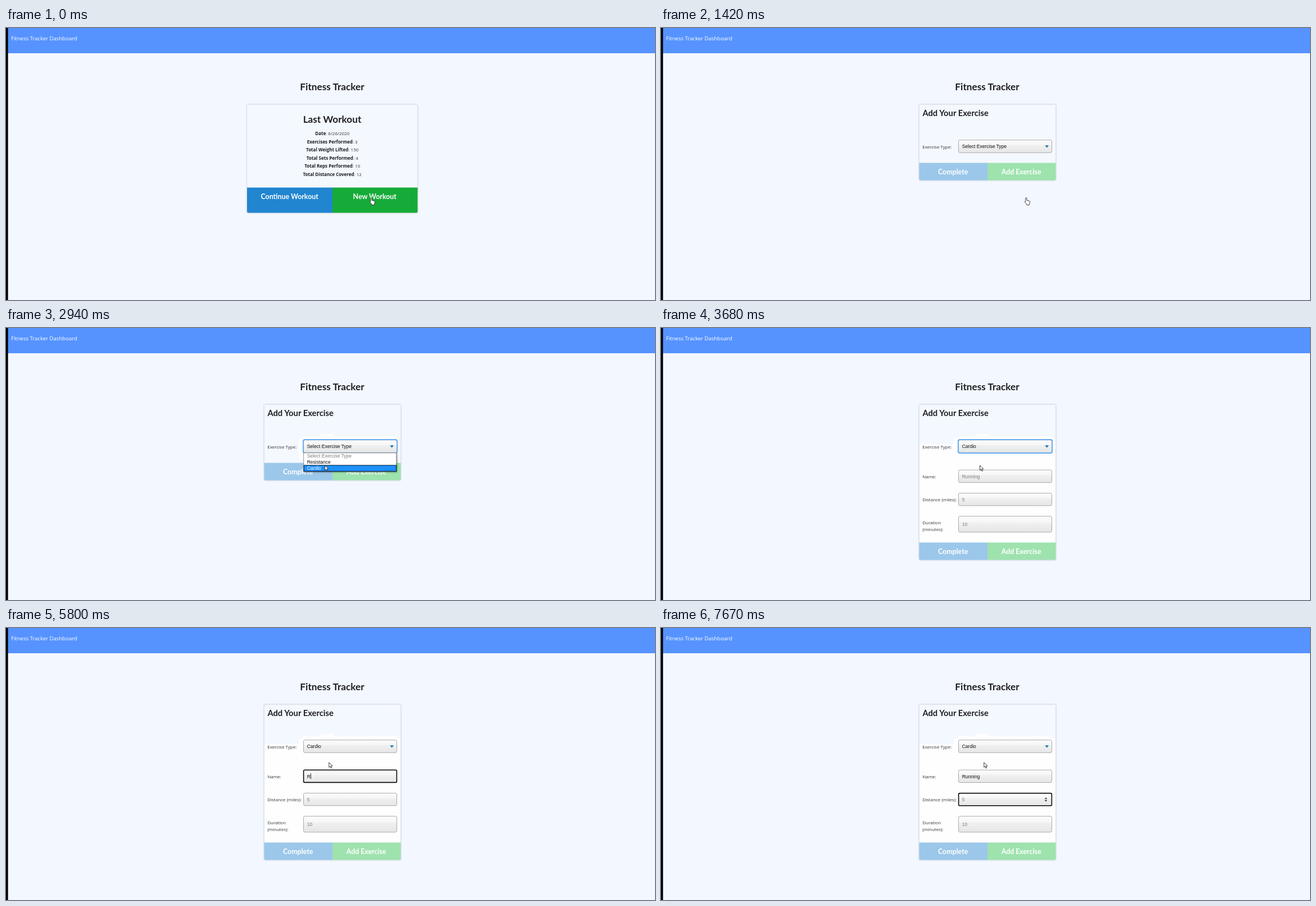
Animation, 1155 px wide and 485 px high, one loop 8 s. Source, as an HTML page:

```html
<!DOCTYPE html>
<html lang="en">
<head>
<meta charset="utf-8">
<title>Fitness Tracker</title>
<style>
html, body { margin: 0; width: 100%; height: 100%; overflow: hidden; background: #f3f7ff; }
svg { display: block; width: 1155px; height: 485px; }
text { fill: #303235; font: 8px "Open Sans", "Noto Sans", sans-serif; white-space: pre; }
.title { font: 700 17.2px Lato, sans-serif; fill: #1d1f22; }
.sub { font: 700 14.75px Lato, sans-serif; fill: #1d1f22; }
.btn { font: 700 12.35px Lato, sans-serif; fill: #fff; }
.mid { text-anchor: middle; }
.ctl { font: 8.52px "Liberation Sans", Arial, sans-serif; fill: #111; }
.ctl.hint { fill: #7d7d7d; }
.b { font-weight: 700; fill: #1d1f22; }
.card { filter: drop-shadow(0 .7px 1.3px #0005); }
.box { fill: url(#shade); stroke: #aaa; }
.focus { fill: none; stroke: #0b0b0b; stroke-width: 1.6; }
.cursor { fill: #fff; stroke: #111; stroke-width: .8; stroke-linejoin: round; }
.menu { filter: drop-shadow(1px 1.5px 1.2px #0008); }
</style>
</head>
<body>
<svg viewBox="0 0 1155 485">
  <defs>
    <linearGradient id="shade" x2="0" y2="1">
      <stop stop-color="#fcfcfd"/>
      <stop offset=".38" stop-color="#f6f6f7"/>
      <stop offset=".42" stop-color="#f0f0f0"/>
      <stop offset="1" stop-color="#e6e6e6"/>
    </linearGradient>
    <clipPath id="round"><rect x="429" y="136.5" width="303.5" height="193" rx="2.5"/></clipPath>
  </defs>
  <rect width="1155" height="485" fill="#f3f7ff"/>
  <rect width="1155" height="45" fill="#5693ff"/>
  <rect width="3.6" height="485"/>
  <text x="9" y="22" style="font-size:9.55px;fill:#fff">Fitness Tracker Dashboard</text>
  <text class="title mid" x="580.5" y="111.2">Fitness Tracker</text>

  <g id="home">
    <rect class="card" x="429" y="136.5" width="303.5" height="193" rx="2.5" fill="#f4f8ff"/>
    <g clip-path="url(#round)">
      <rect x="429" y="284.5" width="152.3" height="46" fill="#2185d0"/>
      <rect id="newBtn" x="581" y="284.5" width="152" height="46"/>
    </g>
    <text class="title mid" x="580.5" y="169">Last Workout</text>
    <g id="stats"></g>
    <text class="btn mid" x="504.7" y="304.8">Continue Workout</text>
    <text class="btn mid" x="656.2" y="304.8">New Workout</text>
  </g>

  <g id="form">
    <rect id="card" class="card" x="459.5" y="136.5" width="243" rx="2" fill="#f4f8ff"/>
    <path id="glowA" fill="#fefeff" d="M529 193H560V189H583V193H696V199H529Z"/>
    <path id="glowB" fill="#fefeff" d="M521 197H698V234H521Z"/>
    <path id="body" fill="#fefeff" d="M460 207H521V197H702V383H460Z"/>
    <text class="sub" x="465.4" y="157">Add Your Exercise</text>
    <text x="465.2" y="214.5">Exercise Type:</text>
    <rect class="box" x="529.5" y="199.8" width="166" height="22.5" rx="2.5"/>
    <rect id="ring" x="528.9" y="199.1" width="167.3" height="24" rx="3" fill="none" stroke="#68adf2" stroke-width="2"/>
    <text id="choice" class="ctl" x="535.7" y="214"></text>
    <path fill="#1873b0" d="M683.3 209.2H690.2L686.7 213.4Z"/>
    <g id="more">
      <text x="465.2" y="268">Name:</text>
      <text x="465.2" y="309.4">Distance (miles):</text>
      <text x="465.2" y="350.4">Duration</text>
      <text x="465.2" y="362">(minutes):</text>
      <rect class="box" x="529.5" y="253.2" width="166" height="22.3" rx="2.5"/>
      <rect class="box" x="529.5" y="294.5" width="166" height="22.3" rx="2.5"/>
      <rect class="box" x="529.5" y="335.6" width="166" height="28.4" rx="2.5"/>
      <text id="name" class="ctl" x="535.7" y="267.5"></text>
      <text class="ctl hint" x="535.7" y="308.8">5</text>
      <text class="ctl hint" x="535.7" y="353">10</text>
      <rect id="nameFocus" class="focus" x="529.6" y="253.3" width="165.8" height="22.1" rx="2"/>
      <g id="distFocus">
        <rect class="focus" x="529.6" y="294.6" width="165.8" height="22.1" rx="2"/>
        <path fill="#333" d="M682.4 304.8H687.4L684.9 302.2ZM682.4 306.8H687.4L684.9 309.4Z"/>
      </g>
      <rect id="caret" width=".8" height="10"/>
    </g>
    <g id="actions">
      <path fill="#9bc7ea" d="M459.5 0H581.2V31H461.5Q459.5 31 459.5 29Z"/>
      <path fill="#9ee2ae" d="M581 0H702.5V29Q702.5 31 700.5 31H581Z"/>
      <text class="btn mid" x="519.7" y="20.8">Complete</text>
      <text class="btn mid" x="641.2" y="20.8">Add Exercise</text>
    </g>
    <g id="menu">
      <rect class="menu" x="529.8" y="222.8" width="165" height="33" fill="#fff" stroke="#777" stroke-width=".7"/>
      <rect id="mark" x="530.2" width="164.3" height="10.6"/>
      <text class="ctl hint" x="535.7" y="231">Select Exercise Type</text>
      <text id="opt1" class="ctl" x="535.7" y="242">Resistance</text>
      <text id="opt2" class="ctl" x="535.7" y="253">Cardio</text>
    </g>
  </g>

  <path id="hand" class="cursor" d="M3.2.5C4 .5 4.4 1 4.4 1.7V5.3L8.6 6.3C9.5 6.5 9.9 7 9.8 7.9L9.2 11.2 8.6 12.3V13.6H4.2V12.4L.9 8.6C.4 7.8 1.2 6.9 2.1 7.6V1.7C2.1 1 2.5.5 3.2.5Z"/>
  <path id="arrow" class="cursor" d="M.5.5V9.3L2.6 7.4 4 10.8 5.4 10.2 4 6.9H6.8Z"/>
  <path id="beam" fill="none" stroke="#222" stroke-width=".8" d="M-2-6H2M0-6V6M-2 6H2"/>
</svg>
<script>
const LOOP = 8000;
const $ = id => document.getElementById(id);
const show = (id, on) => { $(id).style.display = on ? '' : 'none'; };
const set = (id, attrs) => { for (const k in attrs) $(id).setAttribute(k, attrs[k]); };

$('stats').innerHTML = [
  ['Date', '6/26/2020'], ['Exercises Performed', 3], ['Total Weight Lifted', 150],
  ['Total Sets Performed', 4], ['Total Reps Performed', 10], ['Total Distance Covered', 12]
].map(([label, value], i) =>
  `<text class="mid" x="580.7" y="${191 + i * 14.55}"><tspan class="b">${label}</tspan>: ${value}</text>`
).join('');

// Start time, pointer kind, x, y
const pointer = [
  [0, 'hand', 646.7, 302],
  [1720, 'arrow', 626, 268], [1845, 'arrow', 590, 222], [1970, 'arrow', 567, 189],
  [2120, 'arrow', 572, 202], [2240, 'arrow', 575.3, 207.7],
  [2540, 'arrow', 574, 217], [2665, 'arrow', 571, 227], [2790, 'arrow', 568, 236],
  [2940, 'arrow', 567, 244.5],
  [4400, 'beam', 570.5, 251], [4700, 'beam', 570.5, 258], [4825, 'beam', 570.5, 256],
  [4940, 'beam', 570.5, 249], [5090, 'arrow', 574.3, 239.2]
];

// Start time, letters typed, caret x
const typing = [
  [0, 0, 536], [5800, 1, 542.2], [5920, 2, 547], [6170, 3, 551.7],
  [6290, 4, 556.4], [6440, 5, 558.3], [6720, 6, 563], [6840, 7, 567.8]
];

// Start time, row, fill, outline
const marks = [
  [0, 0, '#c8c8c8', 'none'], [2790, 1, '#1e90ff', '#08182c'], [2940, 2, '#1e90ff', '#08182c']
];

const at = (table, t) => table.filter(row => row[0] <= t).pop();
const between = (t, a, b) => t >= a && t < b;

function draw(t) {
  const open = between(t, 2390, 3680), full = t >= 3680;
  show('home', t < 1420);
  show('form', t >= 1420);
  $('newBtn').style.fill = t < 840 ? '#16ab39' : '#159a36';

  show('glowA', t >= 2120);
  show('glowB', open);
  show('body', full);
  show('more', full);
  show('menu', open);
  show('ring', between(t, 2390, 4700));
  set('card', { height: full ? 277 : 135 });
  set('actions', { transform: `translate(0 ${full ? 382.5 : 240.5})` });
  $('choice').textContent = full ? 'Cardio' : 'Select Exercise Type';

  const [, row, fill, stroke] = at(marks, t);
  set('mark', { y: 223.2 + row * 10.8, fill, stroke });
  [1, 2].forEach(i => { $('opt' + i).style.fill = row === i ? '#fff' : '#111'; });

  const [, count, caretX] = at(typing, t);
  $('name').textContent = count ? 'Running'.slice(0, count) : 'Running';
  $('name').classList.toggle('hint', !count);
  show('nameFocus', between(t, 4700, 7240));
  show('distFocus', t >= 7240);
  show('caret', between(t, 4700, 5400) || between(t, 5800, 7670));
  set('caret', t < 7240 ? { x: caretX, y: 259 } : { x: 536, y: 301 });

  const [, kind, x, y] = at(pointer, t);
  ['hand', 'arrow', 'beam'].forEach(id => show(id, id === kind));
  set(kind, { transform: `translate(${x} ${y})` });
}

const start = performance.now();
function tick() {
  draw((performance.now() - start) % LOOP);
  requestAnimationFrame(tick);
}
tick();
</script>
</body>
</html>
```
